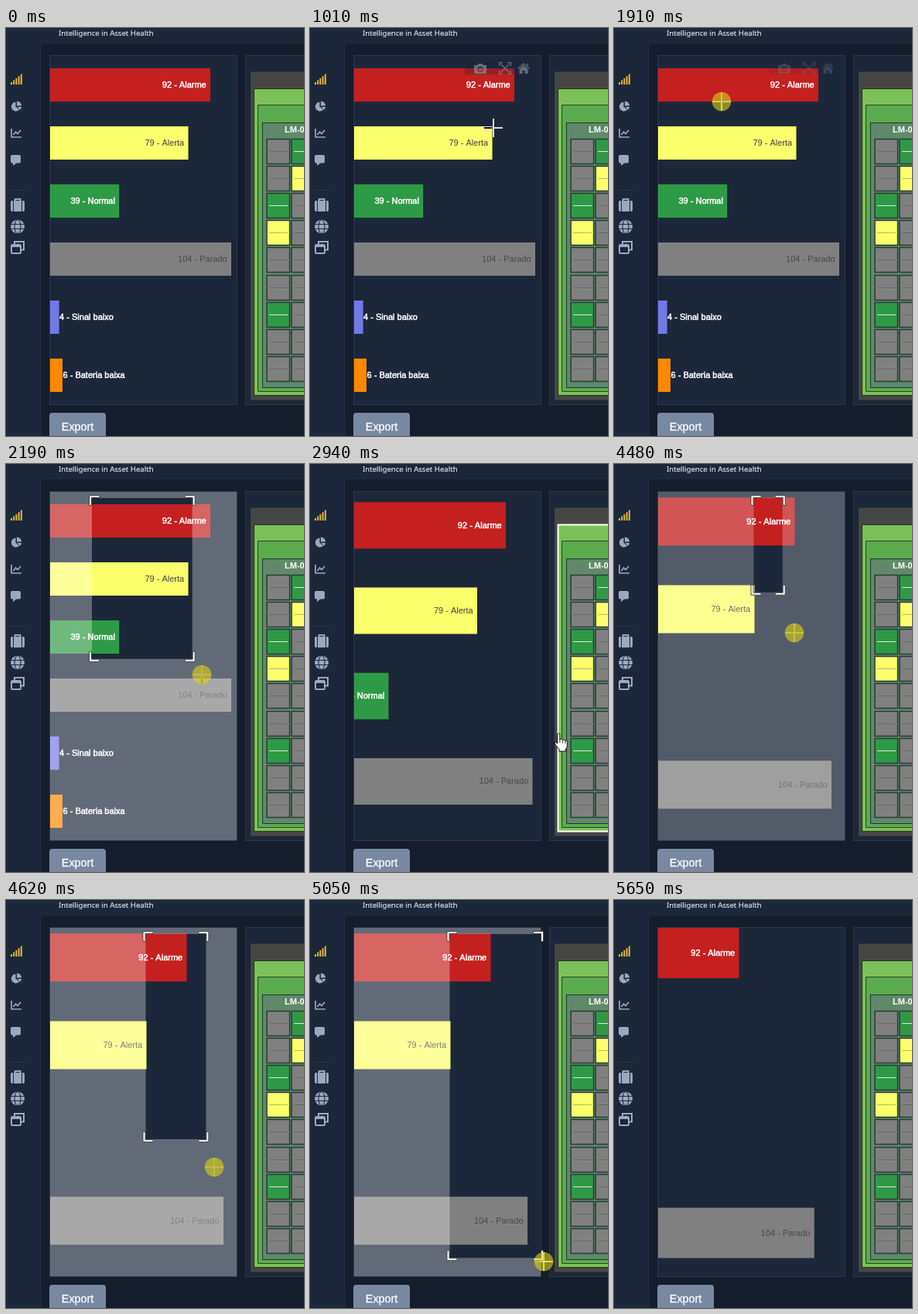
An HTML page with a canvas that plays this animation: 385 px wide and 527 px high, repeating every 6470 ms.

```html
<!DOCTYPE html>
<html lang="pt">
<head>
<meta charset="utf-8">
<title>Asset health</title>
<style>
html, body { margin: 0; width: 100%; height: 100%; overflow: hidden; background: #151c2b; }
canvas { display: block; }
</style>
</head>
<body>
<canvas id="stage" width="385" height="527"></canvas>
<script>
const ctx = document.getElementById('stage').getContext('2d');
const LOOP = 6470;
const SANS = '"Liberation Sans", Arial, sans-serif';
const PANEL = { x: 57, y: 36, r: 298, b: 486 };
const NAVY = '#1d273a';

// screen refreshes: first time, last time, number of steps
const BURSTS = [
  [450, 1080, 10], [1150, 1560, 6], [1760, 2400, 10], [2470, 2610, 3], [2880, 2940, 2],
  [3190, 3810, 9], [4270, 4910, 10], [4980, 5050, 2], [5250, 5650, 6]
];

// pointer path: time, x, y
const PATH = [
  [450, 118, 492], [660, 146, 405], [870, 208, 220], [1080, 251, 83],
  [1310, 180, 62], [1560, 111, 44], [1700, 111, 44], [1840, 119, 60], [1902, 139, 95],
  [2050, 203, 199], [2130, 240.5, 251.5], [2187, 253, 272], [2400, 306, 338], [2610, 322, 351],
  [3190, 320, 345], [3500, 250, 190], [3660, 205, 88], [3810, 180, 44],
  [4200, 180, 44], [4340, 194, 84], [4480, 232, 215], [4570, 258.5, 309.5], [4625, 269, 345],
  [4910, 295, 455], [5050, 302, 467], [5250, 303, 470], [5650, 338, 542]
];

const DRAGS = [
  { from: 1760, to: 2880, x: 111, y: 44 },
  { from: 4270, to: 5250, x: 180.5, y: 44 }
];

const BARS = [
  ['92 - Alarme', '#c4201f', '#fff'],
  ['79 - Alerta', '#fbff6c', '#444'],
  ['39 - Normal', '#2f9a45', '#fff'],
  ['104 - Parado', '#808080', '#484848'],
  ['4 - Sinal baixo', '#7378e6', '#fff'],
  ['6 - Bateria baixa', '#ff8800', '#fff']
];

// chart zoom levels
const VIEWS = [
  { from: 0, y: 73.5, pitch: 75, h: 43, ends: [264, 235.5, 146.2, 291, 68.6, 73] },
  { from: 2880, y: 79.3, pitch: 110.2, h: 60, ends: [253, 216, 101.5, 287.5] },
  { from: 3190, y: 74.3, pitch: 113.3, h: 62, ends: [233.5, 181.5, 0, 281] },
  { from: 5250, y: 68.5, pitch: 120.5, h: 65, ends: [161.5, 0, 0, 258.7] }
];

const clamp = (v, a, b) => Math.min(b, Math.max(a, v));

function snap(t) {
  let last = 0;
  for (const [a, b, n] of BURSTS) {
    if (t + 8 < a) break;
    const step = (b - a) / (n - 1);
    last = a + step * Math.min(n - 1, Math.floor((t + 8 - a) / step));
  }
  return last;
}

function pointerAt(t) {
  let i = 0;
  while (i < PATH.length - 2 && PATH[i + 1][0] <= t) i++;
  const [t0, x0, y0] = PATH[i], [t1, x1, y1] = PATH[i + 1];
  const k = clamp((t - t0) / (t1 - t0), 0, 1);
  return { x: x0 + (x1 - x0) * k, y: y0 + (y1 - y0) * k };
}

function paint(path, fill, stroke, lw = 1, rule = 'nonzero') {
  if (fill) { ctx.fillStyle = fill; ctx.fill(path, rule); }
  if (stroke) { ctx.strokeStyle = stroke; ctx.lineWidth = lw; ctx.stroke(path); }
}

const shape = (d, ...style) => paint(new Path2D(d), ...style);

function rect(x, y, w, h, ...style) {
  const p = new Path2D();
  p.rect(x, y, w, h);
  paint(p, ...style);
}

function rounded(x, y, w, h, r, ...style) {
  const p = new Path2D();
  p.roundRect(x, y, w, h, r);
  paint(p, ...style);
}

function oval(x, y, rx, ry, ...style) {
  const p = new Path2D();
  p.ellipse(x, y, rx, ry, 0, 0, 7);
  paint(p, ...style);
}

function text(s, x, y, font, fill, align = 'left', weight = 0) {
  ctx.font = font;
  ctx.textAlign = align;
  ctx.fillStyle = ctx.strokeStyle = fill;
  ctx.fillText(s, x, y);
  if (weight) {
    ctx.lineWidth = weight;
    ctx.strokeText(s, x, y);
  }
}

function drawSidebar() {
  const ink = '#9ca8be';
  rect(0, 0, 46, 527, NAVY);
  for (let i = 0; i < 5; i++) rect(6 + i * 3.2, 70 - i * 2.6, 2, 3 + i * 2.6, '#e2b532');
  shape('M12.5 95.5 A6 6 0 1 0 17 105.8 L12.5 101.5 Z', ink);
  shape('M14 94.5 A6 6 0 0 1 20 100.5 L14 100.5 Z M14.5 102 L20 102 A6 6 0 0 1 18 106 Z', ink);
  shape('M7 130 V141 H20 M9.5 138 L12.5 134 L15 136.5 L19 132', null, ink, 1.7);
  rounded(6, 164, 13, 10.5, 2, ink);
  shape('M9 174 V178 L14 174 Z', ink);
  rect(5, 209, 22, 1, '#2a364b');
  rounded(6, 223, 18, 14, 2, ink);
  rect(9, 223, 1, 14, NAVY);
  rect(20, 223, 1, 14, NAVY);
  shape('M11.5 223 V221 H18.5 V223', null, ink, 1.8);
  oval(15, 256.5, 9, 9, ink);
  oval(15, 256.5, 4, 9, null, NAVY, 1.1);
  shape('M6 253.5 H24 M6 259.5 H24', null, NAVY, 1.1);
  shape('M11 279 V276 H23 V286.5 H20', null, ink, 2);
  rounded(7, 280, 12, 11, 1.5, null, ink, 2);
  rect(7, 280, 12, 3, ink);
}

function drawTree(lit) {
  rect(309.5, 35.5, 90, 451, NAVY, '#2c384e');
  rect(316, 56.5, 80, 424, '#474746');
  rect(320.5, 78.5, 80, 396, '#7cc157', lit ? '#fff' : '#23331f', lit ? 2 : 1);
  rect(325.5, 99.5, 80, 370, '#5bab4d', '#274326');
  rect(331.5, 122.5, 80, 342, '#5f8a69', '#1f3730');
  text('LM-01', 360, 135, 'bold 11px ' + SANS, '#fff');
  const tones = { g: '#808080', n: '#2f9a45', y: '#fbff6c' };
  const lines = { g: '#686868', n: '#d5efd8', y: '#b9bb66' };
  ['ggnyggngg', 'nyggggggg'].forEach((col, c) => {
    [...col].forEach((k, r) => {
      const x = 337 + c * 32, y = Math.floor(143 + r * 35.2);
      rect(x, y + 0.5, 29.5, 32, tones[k], '#2b3a3a', 1.5);
      rect(x + 3, y + 16, 24, 1, lines[k]);
    });
  });
}

function drawBars(view) {
  view.ends.forEach((end, i) => {
    if (!end) return;
    const [label, fill, ink] = BARS[i];
    const y = view.y + i * view.pitch;
    const small = i > 3;
    rect(57, y - view.h / 2, end - 57, view.h, fill);
    text(label, small ? end + 0.5 : end - 5.3, Math.floor(y + 4), '11px ' + SANS, ink,
      small ? 'left' : 'right', ink === '#fff' ? 0.5 : 0);
  });
}

function drawTools(alpha) {
  if (alpha <= 0) return;
  ctx.save();
  ctx.globalAlpha = alpha;
  rect(200, 44, 88, 16, 'rgba(29,39,58,.3)');
  const ink = 'rgba(140,145,153,.65)';
  shape('M212 48 H216 L217.5 46 H222.5 L224 48 H228 V59 H212 Z M220 49.8 a3.6 3.6 0 1 0 .01 0 Z',
    ink, null, 1, 'evenodd');
  oval(220, 53.4, 2, 2, ink);
  shape('M244.7 49 V44.7 H249 M255 44.7 H259.3 V49 M259.3 55 V59.3 H255 M249 59.3 H244.7 V55 ' +
    'M247 47 L257 57 M257 47 L247 57', null, ink, 1.5);
  shape('M276 45 L284 52 L283 53 L276 47 L269 53 L268 52 Z M280 46 h2 v3 l-2 -2 Z', ink);
  shape('M270.5 53 L276 48.3 L281.5 53 V59 H277.5 V55 H274.5 V59 H270.5 Z', ink);
  ctx.restore();
}

function drawZoom(drag, tip, alpha) {
  const l = drag.x, t = drag.y;
  const r = clamp(tip.x, l, PANEL.r), b = clamp(tip.y, t, PANEL.b);
  const p = new Path2D();
  p.rect(PANEL.x, PANEL.y, PANEL.r - PANEL.x, PANEL.b - PANEL.y);
  p.rect(l, t, r - l, b - t);
  paint(p, `rgba(255,255,255,${alpha})`, null, 1, 'evenodd');
  const n = Math.floor(Math.min(b - t, r - l, 20) / 2);
  for (const [x, y, sx, sy] of [[l, t, 1, 1], [r, t, -1, 1], [r, b, -1, -1], [l, b, 1, -1]]) {
    ctx.save();
    ctx.translate(x, y);
    ctx.scale(sx, sy);
    shape(`M-3.5 ${n - 0.5} h3 v${-n} h${n} v-3 h${-n - 3} Z`, '#fff', '#444');
    ctx.restore();
  }
}

function drawPointer(kind, x, y, held) {
  ctx.save();
  ctx.translate(Math.round(x), Math.round(y));
  if (kind === 'cross') {
    ctx.save();
    ctx.globalCompositeOperation = 'difference';
    rect(-12, -1, 24, 2, '#fff');
    rect(-1, -12, 2, 11, '#fff');
    rect(-1, 1, 2, 11, '#fff');
    ctx.restore();
    if (held) oval(0, 0, 12.3, 12.3, 'rgba(222,212,20,.6)');
  } else if (kind === 'hand') {
    shape('M-1.5 1 Q0 -1.5 1.8 1 V8 Q4 6 5.5 8.5 Q7.5 7 8.7 9.5 Q11 8.5 11.3 11 V16 ' +
      'Q11 19 9.5 20 V23 H1 V20.5 Q-3 16 -5 13 Q-4 10 -1.5 13 Z', '#fff', '#111');
    shape('M1.8 8 V12 M5.5 9 V12.5 M8.7 10 V13', null, '#111', 0.8);
  } else {
    shape('M0 0 V16 L3.8 12.5 L6.3 18.5 L8.8 17.4 L6.3 11.6 H11.5 Z', '#fff', '#111');
  }
  ctx.restore();
}

function toolsAlpha(t) {
  if (t >= 450 && t < 1760) return clamp((t - 380) / 200, 0, 1);
  if (t >= 1760 && t < 2150) return clamp(1 - (t - 1700) / 350, 0, 1);
  if (t >= 3260 && t < 4270) return clamp((t - 3200) / 250, 0, 1);
  if (t >= 4270 && t < 4600) return clamp(1 - (t - 4200) / 300, 0, 1);
  return 0;
}

function draw(time) {
  const t = snap(time);
  const tip = pointerAt(t);
  const drag = DRAGS.find(d => t >= d.from && t < d.to);
  const lit = t >= 2940 && t < 3260;

  rect(0, 0, 385, 527, '#151c2b');
  rect(46, 0, 339, 20, NAVY);
  drawSidebar();
  text('Intelligence in Asset Health', 68, 10, '9.6px "Noto Sans", "Open Sans", sans-serif',
    '#d9dee6', 'left', 0.2);
  rounded(56, 497, 73, 36, 4, '#7988a1');
  text('Export', 92.5, 520, '14.3px ' + SANS, '#fff', 'center', 0.3);
  drawTree(lit);

  rect(56.5, 35.5, 242, 451, NAVY, '#2c384e');
  ctx.save();
  ctx.beginPath();
  ctx.rect(PANEL.x, PANEL.y, PANEL.r - PANEL.x, PANEL.b - PANEL.y);
  ctx.clip();
  drawBars(VIEWS.filter(v => t >= v.from).pop());
  drawTools(toolsAlpha(t));
  ctx.restore();

  if (drag) {
    // the selection trails the pointer slightly
    const corner = pointerAt(t - 56);
    if (corner.x - drag.x > 12 && corner.y - drag.y > 20) {
      drawZoom(drag, corner, 0.31 * clamp((t - drag.from - 60) / 200, 0, 1));
    }
  }

  if (t >= 450) {
    const inside = tip.x < PANEL.r && tip.y < PANEL.b;
    const kind = lit ? 'hand' : drag || inside ? 'cross' : 'arrow';
    drawPointer(kind, tip.x, tip.y, drag);
  }
}

const start = performance.now();
function tick() {
  draw((performance.now() - start) % LOOP);
  requestAnimationFrame(tick);
}
tick();
</script>
</body>
</html>
```
